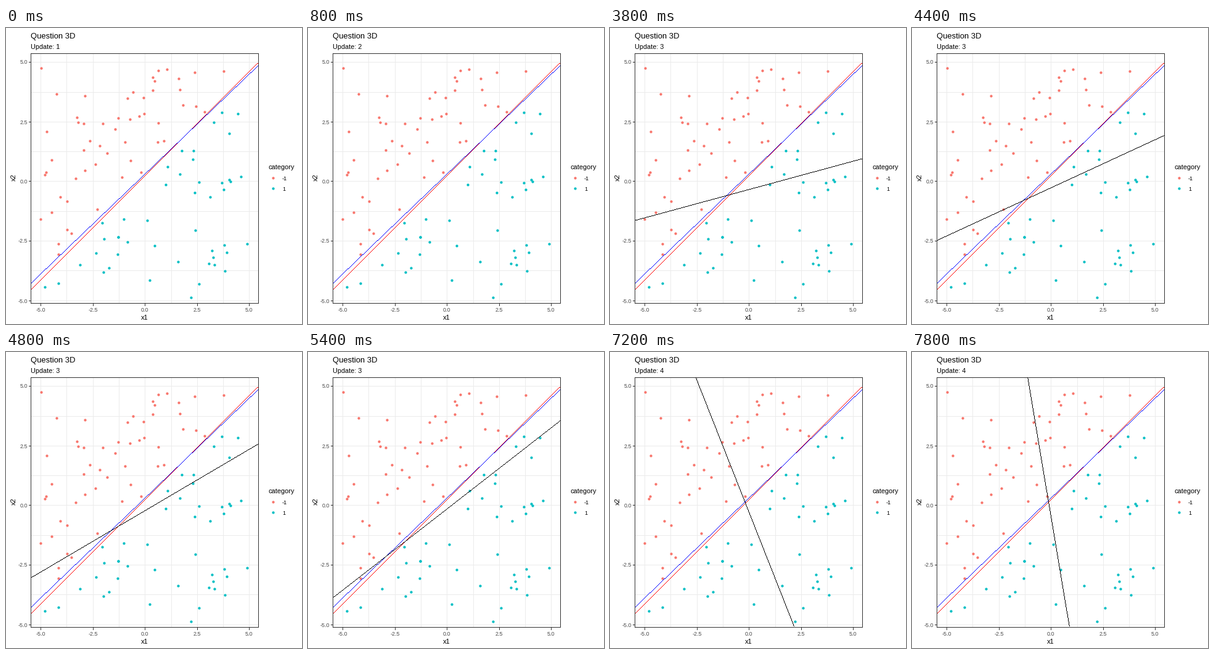
Animation, 480 px wide and 480 px high, one loop 8000 ms. Source, as a matplotlib script:

```python
import numpy as np
import matplotlib.pyplot as plt
from matplotlib.animation import FuncAnimation
from matplotlib.patches import Rectangle

SIZE, DPI = 480, 72
STEP_MS, FRAMES = 200, 40
LEFT, RIGHT, TOP, BOTTOM = 40, 409, 41, 446   # panel border pixels
CORAL, TEAL = "#F8766D", "#00BFC4"
DARK, GRID, LABEL = "#333333", "#EBEBEB", "#4D4D4D"

plt.rcParams["font.family"] = "Liberation Sans"

fig = plt.figure(figsize=(SIZE / DPI, SIZE / DPI), dpi=DPI, facecolor="white")
ax = fig.add_axes([0, 0, 1, 1])
ax.set_xlim(0, SIZE)
ax.set_ylim(SIZE, 0)
ax.axis("off")


def to_px(x, y):
    """Data coordinates to whole pixels."""
    return np.round(225.3 + 33.84 * x), np.round(248.4 - 38.64 * y)


def stroke(x0, y0, x1, y1, color, z):
    ax.plot([x0, x1], [y0, y1], color=color, lw=1, antialiased=False,
            solid_capstyle="butt", zorder=z)


def label(x, y, text, size, color="black", **kw):
    return ax.text(x, y, text, fontsize=size, color=color, zorder=6, **kw)


def raster(y_left, y_right):
    """One-pixel-wide straight line across the inside of the panel."""
    xl, xr = LEFT + 1, RIGHT - 1
    slope = (y_right - y_left) / (xr - xl)
    if abs(slope) <= 1:
        x = np.arange(xl, xr + 1)
        y = np.round(y_left + slope * (x - xl))
    else:
        y = np.arange(TOP + 1, BOTTOM)
        x = np.round(xl + (y - y_left) / slope)
    keep = (x > LEFT) & (x < RIGHT) & (y > TOP) & (y < BOTTOM)
    return x[keep], y[keep]


def pixels(x, y, color, z):
    return ax.plot(x, y, ",", color=color, zorder=z)[0]


def dots(x, y, color):
    ax.scatter(x, y, s=18, color=color, linewidths=0, antialiased=False, zorder=3)


def sample(rng, count, side):
    """Uniform points on one side of the separating line."""
    points = []
    while len(points) < count:
        x, y = rng.uniform(-5, 5, 2)
        if side * (y - 0.87 * x - 0.2) > 0.15:
            points.append((x, y))
    return np.array(points).T


# grid, ticks and tick labels
for value in np.arange(-5, 5.1, 1.25):
    gx, gy = to_px(value, value)
    stroke(gx, TOP, gx, BOTTOM, GRID, 1)
    stroke(LEFT, gy, RIGHT, gy, GRID, 1)
    if value % 2.5 == 0:
        stroke(gx, BOTTOM + 1, gx, BOTTOM + 4, DARK, 2)
        stroke(LEFT - 3, gy, LEFT, gy, DARK, 2)
        label(gx, 460, f"{value:.1f}", 9, LABEL, ha="center")
        label(35.5, gy + 3.5, f"{value:.1f}", 9, LABEL, ha="right")

rng = np.random.default_rng(3)
dots(*to_px(*sample(rng, 54, 1)), CORAL)
dots(*to_px(*sample(rng, 46, -1)), TEAL)

pixels(*raster(424.3, 57.5), "red", 4)
pixels(*raster(413.5, 62), "blue", 4.2)

ax.add_patch(Rectangle((LEFT, TOP), RIGHT - LEFT, BOTTOM - TOP,
                       fill=False, ec=DARK, lw=1, antialiased=False, zorder=5))

# titles and legend
label(39.5, 17, "Question 3D", 13)
update_text = label(39.5, 34, "", 10.8)
label(225, 473, "x1", 11, ha="center")
label(12.5, 242.5, "x2", 11, rotation=90, ha="center", va="center")
label(426, 229, "category", 11)
for y, name, color in ((243, "-1", CORAL), (260, "1", TEAL)):
    dots(433, y, color)
    label(448, y + 4, name, 9)

moving = pixels([], [], "black", 4.5)

# heights of the learned line at the panel's left and right edges
SECOND = np.array([301.65, 225.2])
THIRD = np.array([419.7, 87.4])
TOWARD_FOURTH = np.array([-208.4, 212.15])


def edges(i):
    if i < 14:
        return None
    if i < 34:
        return SECOND + (THIRD - SECOND) * np.clip(i - 18, 0, 11) / 11
    return THIRD + TOWARD_FOURTH * (i - 33)


def draw(i):
    update = 1 + (i >= 4) + (i >= 19) + (i >= 34)
    update_text.set_text(f"Update: {update}")
    ends = edges(i)
    moving.set_data(*(([], []) if ends is None else raster(*ends)))
    return update_text, moving


anim = FuncAnimation(fig, draw, frames=FRAMES, interval=STEP_MS,
                     repeat=True, repeat_delay=0, blit=False)
plt.show()
```
